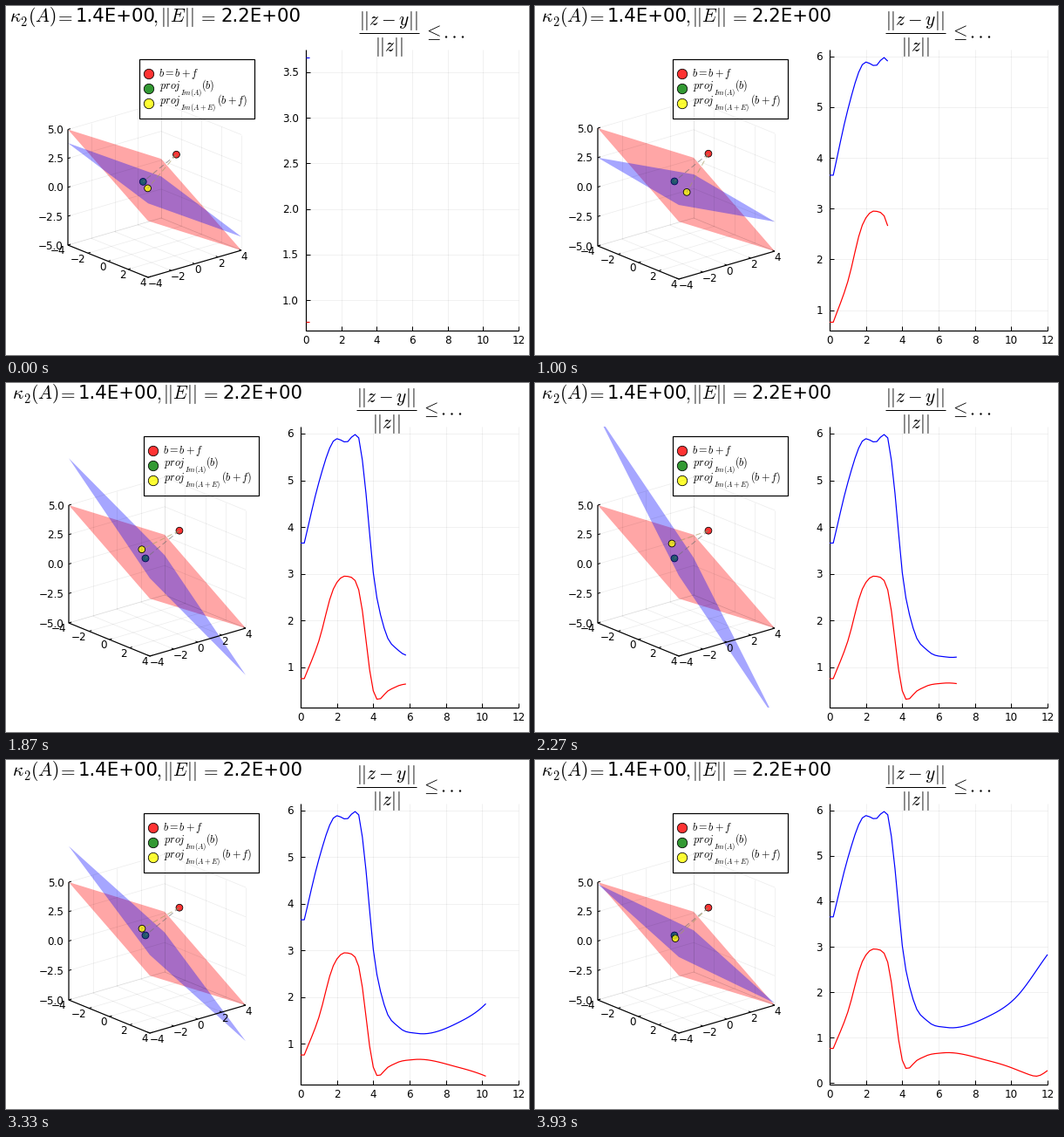
A matplotlib script that plays this animation: 600x400 px, repeating every 3990 ms.

```python
import numpy as np
import matplotlib.pyplot as plt
from matplotlib.animation import FuncAnimation
from matplotlib.collections import LineCollection
from matplotlib.patches import Circle, Polygon, Rectangle

W, H, DPI = 600, 400, 100
LOOP, TICK, STEPS = 3990, 30, 60
STEP_MS = 200 / 3
PX = 72 / DPI
TOP, BOTTOM, X_END = 50, 371.5, 588

plt.rcParams["mathtext.fontset"] = "cm"
plt.rcParams["font.family"] = "DejaVu Sans"

B = np.array([1.03, 0.98, 3.13])
SLOPE_A = (-0.64, -0.61)
TICKS_XY = range(-4, 5, 2)
TICKS_Z = np.linspace(-5, 5, 5)


def smooth(x, knots):
    """Cubic Hermite curve through (x, y) knots."""
    kx, ky = np.array(knots).T
    m = np.gradient(ky, kx)
    j = np.clip(np.searchsorted(kx, x, side="right") - 1, 0, len(kx) - 2)
    h = kx[j + 1] - kx[j]
    s = (x - kx[j]) / h
    return ((1 + 2 * s) * (1 - s) ** 2 * ky[j] + s * (1 - s) ** 2 * h * m[j]
            + s * s * (3 - 2 * s) * ky[j + 1] + s * s * (s - 1) * h * m[j + 1])


XS = np.arange(STEPS + 1) * 0.2
SAMPLE = np.maximum(XS, 0.2)
BOUND = smooth(SAMPLE, [(0.2, 3.66), (1, 4.95), (1.8, 5.84), (2.6, 5.83), (3, 5.98),
                        (3.2, 5.91), (3.6, 4.72), (4, 3.03), (4.6, 1.84), (5.4, 1.36),
                        (6.4, 1.225), (8.6, 1.44), (10.2, 1.86), (12, 2.83)])
# The error is the length of a vector whose main part changes sign twice
MAIN = smooth(SAMPLE, [(0.2, 0.73), (1, 1.54), (1.8, 2.66), (2.6, 2.93), (3.2, 2.64),
                       (4, 0.39), (4.6, -0.29), (5.2, -0.505), (6.2, -0.62),
                       (8.6, -0.49), (10.2, -0.284), (11.2, -0.07), (12, 0.21)])
ERROR = np.hypot(MAIN, 0.215 + 0.105 * np.sin((SAMPLE - 0.2) / 2))

fig = plt.figure(figsize=(W / DPI, H / DPI), dpi=DPI, facecolor="white")
ax = fig.add_axes([0, 0, 1, 1])


def lines(segments, color="black", width=1.0, **kw):
    ax.add_collection(LineCollection(segments, colors=color, linewidths=width * PX,
                                     **kw), autolim=False)


def grid(segments):
    lines(segments, width=0.8, alpha=0.07)


def text(x, y, s, size=12, ha="left"):
    ax.text(x, y, s, fontsize=size * PX, ha=ha, va="baseline", color="black")


def tick_label(x, y, s, ha):
    text(x, y + 4.4, s.replace("-", "\u2212"), 12, ha)


def dot(p, color, r):
    ax.add_patch(Circle(p, r, fc=color, ec="none", alpha=0.8))
    ax.add_patch(Circle(p, r, fc="none", ec="black", lw=0.8 * PX))


class Scene:
    """Oblique view of the box [-4,4] x [-4,4] x [-5,5]."""

    def __init__(self, left, front, right, height):
        self.left, front, right = (np.array(p, float) for p in (left, front, right))
        self.du = (front - self.left) / 8
        self.dv = (right - front) / 8
        self.dz = np.array([0, -height / 10])

    def at(self, u, v, z):
        return self.left + (u + 4) * self.du + (v + 4) * self.dv + (z + 5) * self.dz

    def seg(self, a, b):
        return [self.at(*a), self.at(*b)]

    def plane(self, slope, color):
        corners = [(-4, -4), (-4, 4), (4, 4), (4, -4)]
        pts = [self.at(u, v, slope[0] * u + slope[1] * v) for u, v in corners]
        patch = ax.add_patch(Polygon(pts, fc=color, ec="none", alpha=0.35))
        patch.set_clip_path(Rectangle((0, TOP), 330, 322, transform=ax.transData))

    def axes(self):
        seg = self.seg
        faint, ticks = [], []
        for k in TICKS_XY:
            faint += [seg((k, -4, -5), (k, 4, -5)), seg((-4, k, -5), (4, k, -5)),
                      seg((-4, k, -5), (-4, k, 5)), seg((k, 4, -5), (k, 4, 5))]
            ticks += [seg((k, -4, -5), (k, -3.78, -5)), seg((4, k, -5), (3.78, k, -5))]
            x, y = self.at(k, -4, -5)
            tick_label(x - 2.5, y + 6, str(k), "right")
            x, y = self.at(4, k, -5)
            tick_label(x - 0.5, y + 6.5, str(k), "left")
        for z in TICKS_Z:
            faint += [seg((-4, -4, z), (-4, 4, z)), seg((-4, 4, z), (4, 4, z))]
            ticks.append(seg((-4, -4, z), (-4, -3.78, z)))
            x, y = self.at(-4, -4, z)
            tick_label(x - 5.5, y + 0.3, f"{z:.1f}", "right")
        grid(faint)
        lines(ticks)
        lines([[self.at(-4, -4, 5), self.at(-4, -4, -5),
                self.at(4, -4, -5), self.at(4, 4, -5)]], width=1.2)


NARROW = Scene((72, 275), (165, 313), (275, 281), 135)
WIDE = Scene((71, 274), (163, 311), (270, 280), 132.5)


def perturbed_slope(t):
    c, s = np.cos(t), np.sin(t)
    w = 1 + 0.4395 * c
    total = -(1.491 - 0.114 * c - 0.8415 * s) / w
    diff = (0.375 + 0.129 * c - 0.051 * s) / w
    return (total + diff) / 2, (total - diff) / 2


def project(slope):
    n = np.array([-slope[0], -slope[1], 1])
    return B - n * (B @ n) / (n @ n)


def draw_planes(scene, t):
    scene.axes()
    slope = perturbed_slope(t)
    exact, moved = project(SLOPE_A), project(slope)
    scene.plane(SLOPE_A, "red")
    dot(scene.at(*exact), "green", 3.9)
    scene.plane(slope, "blue")
    dash = dict(linestyles=[(0, (6, 3.5))], alpha=0.65)
    lines([scene.seg(B, exact)], "#707070", **dash)
    lines([scene.seg(B, moved)], "#a89c60", **dash)
    dot(scene.at(*B), "red", 3.9)
    dot(scene.at(*moved), "yellow", 3.9)


def draw_legend(dx):
    ax.add_patch(Rectangle((158 + dx, 61), 132, 68, fc="white", ec="black", lw=1.2 * PX))
    for color, y in (("red", 78), ("green", 95), ("yellow", 112)):
        dot((169 + dx, y), color, 5.7)
    text(180 + dx, 81, "$b = b + f$", 12.2)
    rows = [(95, "$Im(A)$", 229, "$(b)$"), (112, "$Im(A+E)$", 247, "$(b+f)$")]
    for y, sub, end, arg in rows:
        text(181 + dx, y, "$proj$", 12.2)
        text(205 + dx, y + 7, sub, 8.5)
        text(end + dx, y, arg, 12.2)


def draw_titles(dl, dr):
    size = 21.3
    text(7 + dl, 18.5, r"$\kappa$", size)
    text(19.5 + dl, 23, "$2$", 14.5)
    text(28 + dl, 18.5, "$(A)$", size)
    text(69.5 + dl, 18.5, "$=$", size, "center")
    text(82.5 + dl, 18.5, "1.4E+00", size)
    text(171.5 + dl, 18.5, "$,$", size)
    text(199 + dl, 18.5, "$||E||$", size, "center")
    text(233.5 + dl, 18.5, "$=$", size, "center")
    text(249 + dl, 18.5, "2.2E+00", size)
    text(436 + dr, 22, "$||z-y||$", size, "center")
    lines([[(402 + dr, 31), (471 + dr, 31)]])
    text(436 + dr, 52, "$||z||$", size, "center")
    text(486 + dr, 36, r"$\leq$", size, "center")
    for x in (502, 511.5, 521):
        ax.add_patch(Circle((x + dr, 35.5), 1.2, fc="black", ec="none"))


def draw_curves(x0, n, lo, hi, step):
    def px(x):
        return x0 + x * (X_END - x0) / 12

    def py(y):
        return BOTTOM - (y - lo) / (hi - lo) * (BOTTOM - TOP)

    faint, marks = [], []
    for x in range(0, 13, 2):
        faint.append([(px(x), TOP), (px(x), BOTTOM)])
        marks.append([(px(x), BOTTOM), (px(x), BOTTOM - 4.5)])
        tick_label(px(x), 383, str(x), "center")
    for y in np.arange(np.ceil(lo / step), np.floor(hi / step) + 1) * step:
        faint.append([(x0, py(y)), (X_END, py(y))])
        marks.append([(x0, py(y)), (x0 + 4.5, py(y))])
        label = f"{y:.1f}" if step < 1 else f"{abs(y):.0f}"
        tick_label(x0 - 8, py(y), label, "right")
    grid(faint)
    lines(marks)
    lines([[(x0, TOP), (x0, BOTTOM), (X_END, BOTTOM)]], width=1.2)
    for ys, color in ((ERROR, "red"), (BOUND, "blue")):
        lines([np.column_stack([px(XS[:n]), py(ys[:n])])], color, 1.2)


def draw(k):
    # Each tick shows the last step that starts within it
    step = int((k * TICK + 25) / STEP_MS)
    ax.clear()
    ax.set_xlim(0, W)
    ax.set_ylim(H, 0)
    ax.axis("off")
    n = step + 2
    low, high = ERROR[:n].min(), BOUND[:n].max()
    pad = 0.03 * (high - low)
    lo, hi = low - pad, high + pad
    # Decimal tick labels take more room and shift the layout
    wide = hi < 4
    draw_planes(WIDE if wide else NARROW, 0.1 * step)
    draw_legend(-5 if wide else 0)
    draw_titles(-3 if wide else 0, 3 if wide else 0)
    draw_curves(344 if wide else 338, n, lo, hi, 0.5 if wide else 1)
    return []


anim = FuncAnimation(fig, draw, frames=LOOP // TICK, init_func=lambda: [],
                     interval=TICK, repeat=True, repeat_delay=0)
plt.show()
```
